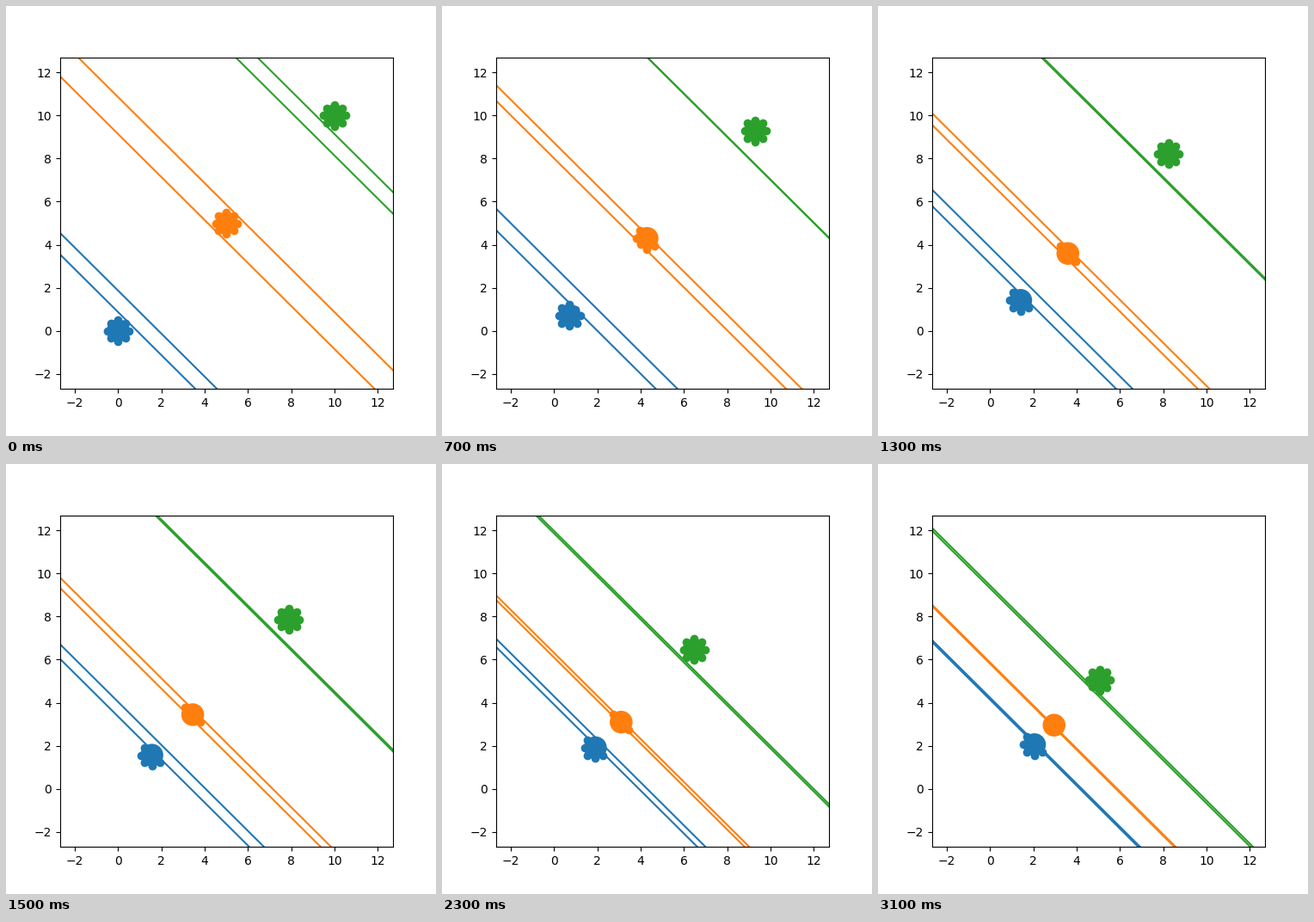
These frames come from a looping animation (500x500 px, 3300 ms). A matplotlib script:

```python
import numpy as np
import matplotlib.pyplot as plt
from matplotlib.animation import FuncAnimation

STEPS = 15
RADIUS = 0.5          # disc radius and top speed
GAIN = 0.1
COLORS = ["C0", "C1", "C2"]
HEADING = np.array([1, -1, -1])
PAIRS = [(0, 1), (0, 2), (1, 2)]
ANGLES = np.arange(8) * np.pi / 4
DIRS = np.column_stack([np.cos(ANGLES), np.sin(ANGLES)])
ROOT2 = np.sqrt(2)


def barriers(s, v):
    """Limits on each agent's velocity, measured as x + y, one per neighbour."""
    low, high = [[], [], []], [[], [], []]
    for i, j in PAIRS:
        slack = GAIN * (s[j] - s[i] - 2 * RADIUS * ROOT2)
        mean = (v[i] + v[j]) / 2
        high[i].append(mean + slack)
        low[j].append(mean - slack)
    return low, high


def simulate():
    """Agents travel on the diagonal, so the sum x + y describes each one."""
    s, v = np.array([0.0, 10.0, 20.0]), np.zeros(3)
    states = []
    for _ in range(STEPS):
        low, high = barriers(s, v)
        states.append((s, low, high))
        v = HEADING * RADIUS * ROOT2
        for i in range(3):
            if HEADING[i] > 0:
                v[i] = min([v[i]] + high[i])
            else:
                v[i] = max([v[i]] + low[i])
        s = s + v
    return states


def reach(d, low, high):
    """How far a velocity along d may go before it meets a limit."""
    rate = d.sum()
    if abs(rate) < 1e-9:
        return RADIUS if min(high, default=1) >= 0 else 0.0
    limits = high if rate > 0 else low
    return max(0.0, min([RADIUS] + [b / rate for b in limits]))


states = simulate()

fig, ax = plt.subplots(figsize=(5, 5), dpi=100)
ax.set_xlim(-2.7, 12.7)
ax.set_ylim(-2.7, 12.7)

span = np.array([-10.0, 25.0])
discs, dots, lines = [], [], []
for color in COLORS:
    discs.append(ax.add_patch(plt.Circle((0, 0), RADIUS, color=color)))
    dots.append(ax.plot([], [], "o", color=color)[0])
    lines.append([ax.plot([], [], color=color)[0] for _ in range(2)])


def draw(n):
    # the opening pose holds for five ticks, each later one for two
    s, low, high = states[max(0, (n - 3) // 2)]
    for i in range(3):
        c = s[i] / 2
        discs[i].center = (c, c)
        tips = np.array([c + d * reach(d, low[i], high[i]) for d in DIRS])
        dots[i].set_data(tips[:, 0], tips[:, 1])
        for line, b in zip(lines[i], low[i] + high[i]):
            line.set_data(span, s[i] + b - span)
    return []


anim = FuncAnimation(fig, draw, frames=33, interval=100, repeat=True,
                     repeat_delay=0, blit=False)
plt.show()
```
